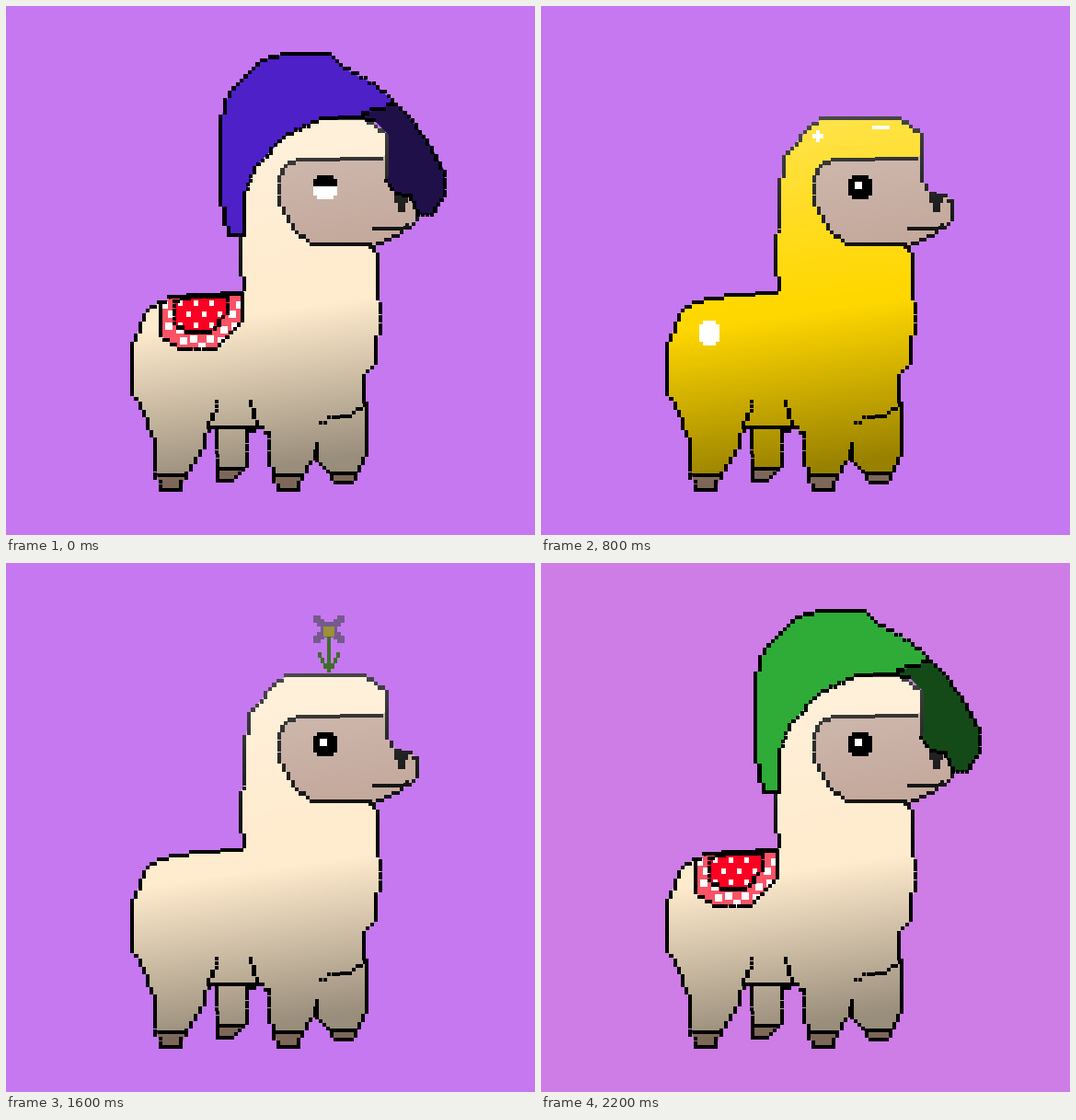
Animation, 575 px wide and 575 px high, one loop 2400 ms. Source, as an HTML page with a canvas:

```html
<!DOCTYPE html>
<html lang="en">
<head>
<meta charset="utf-8">
<title>Alpaca outfits</title>
<style>
html, body { margin: 0; width: 100%; height: 100%; overflow: hidden; }
canvas { display: block; width: 575px; height: 575px; }
</style>
</head>
<body>
<canvas id="stage" width="575" height="575"></canvas>
<script>
const SIZE = 575, CELL = 4.3, STEP = 200;
const stage = document.getElementById('stage').getContext('2d');
const layer = document.createElement('canvas');
layer.width = layer.height = SIZE;
const coat = layer.getContext('2d');

const points = s => s.split(' ').map(p => p.split(',').map(Number));

// Key points, clockwise: head and chest, legs from front to back, rump and neck
const BODY = points(
  '308,122 390,122 414,140 414,190 424,204 440,206 447,212 447,232 430,246 396,262 404,270 404,318 407,324 407,356 402,364 402,388 389,402 389,430 ' +
  '392,432 392,488 376,518 358,518 350,506 338,494 338,476 336,492 322,510 318,526 296,526 286,490 286,464 275,458 262,460 262,500 246,516 230,516 229,458 221,458 211,488 196,508 190,526 168,526 162,500 162,476 146,432 ' +
  '137,422 137,372 150,336 166,322 210,314 256,312 259,304 255,280 255,250 259,240 259,206 264,164 296,128');
const MUZZLE = BODY.slice(3, 10);
const FACE = points('396,259 332,259 312,242 297,212 297,186 304,174 322,167 408,166 414,160');
const CREASES = ['229,430 229,440 220,458 270,458', '266,430 273,456 266,462',
  '342,453 356,447 374,446 390,434', '400,242 430,242 436,238'].map(points);
const HOOVES = points('164,510 229,503 290,510 350,508');

// Starts with the unlined edge over the face; the first 15 points bound the brim
const HAT = points('384,121 400,124 416,140 416,184 413,190 424,204 440,206 448,227 463,227 470,216 477,206 477,180 458,146 434,116 424,107 ' +
  '400,84 386,78 368,68 352,52 304,52 278,59 243,94 233,124 233,208 242,249 259,249 259,208 270,176 302,143 342,122');
const BRIM = [...HAT.slice(0, 15), [402, 112]];
const RUG = points('168,322 186,316 210,314 257,313 257,342 228,373 188,373 168,358');

const scaled = (pts, k, cx = 211, cy = 320) => pts.map(([x, y]) => [cx + (x - cx) * k, cy + (y - cy) * k]);

function trace(g, pts) {
  g.beginPath();
  pts.forEach(p => g.lineTo(...p));
  g.closePath();
}

function fill(g, pts, color) {
  trace(g, pts);
  g.fillStyle = color;
  g.fill();
}

function clipped(g, pts, paint) {
  g.save();
  trace(g, pts);
  g.clip();
  paint();
  g.restore();
}

function rect(g, color, x, y, w, h) {
  const l = Math.round(x), t = Math.round(y);
  g.fillStyle = color;
  g.fillRect(l, t, Math.round(x + w) - l, Math.round(y + h) - t);
}

// Rectangle without its corner pixels
function block(g, color, x, y, w, h) {
  rect(g, color, x + 4, y, w - 8, h);
  rect(g, color, x, y + 4, w, h - 8);
}

// Line of square pixels that moves in whole steps on both axes
function line(g, pts, closed) {
  const path = closed ? [...pts, pts[0]] : pts;
  for (let k = 1; k < path.length; k++) {
    const a = path[k - 1], b = path[k];
    const steps = [0, 1].map(d => Math.round(Math.abs(b[d] - a[d]) / CELL) || 1);
    const n = Math.max(...steps);
    for (let s = 0; s <= n; s++) {
      const [x, y] = [0, 1].map(d => a[d] + (b[d] - a[d]) * Math.round(s / n * steps[d]) / steps[d]);
      rect(g, '#000', x - CELL / 2, y - CELL / 2, CELL, CELL);
    }
  }
}

function randomFrom(seed) {
  return () => (seed = seed * 16807 % 2147483647) / 2147483647;
}

// Ragged blobs leaning to the upper right, on a jittered staggered lattice
function spots(g, color, { x, y, dx, dy, w, h, seed }) {
  const rnd = randomFrom(seed);
  for (let r = 0; r < 10; r++) {
    for (let c = 0; c < 8; c++) {
      const cx = x + (c + r % 2 / 2 + (rnd() - 0.5) * 0.3) * dx;
      const cy = y + (r + (rnd() - 0.5) * 0.3) * dy;
      const width = w * (0.7 + 0.6 * rnd()), rows = Math.round(h / CELL * (0.8 + 0.5 * rnd()));
      for (let k = 0; k < rows; k++) {
        const v = (k + 0.5) / rows * 2 - 1, span = width * (1 - 0.6 * v * v);
        rect(g, color, cx - span / 2 - v * w * 0.15, cy + (k - rows / 2) * CELL, span, CELL);
      }
    }
  }
}

const COAT_SPOTS = { x: 160, y: 145, dx: 72, dy: 47, w: 25, h: 15, seed: 21 };
const HAT_SPOTS = { x: 240, y: 62, dx: 33, dy: 18, w: 10, h: 9, seed: 8 };

function drawBody({ base, dots, shine, light }) {
  coat.globalCompositeOperation = 'source-over';
  coat.clearRect(0, 0, SIZE, SIZE);
  fill(coat, BODY, base);
  clipped(coat, BODY, () => {
    if (dots) spots(coat, dots, COAT_SPOTS);
    HOOVES.forEach(([x, y]) => {
      rect(coat, light ? '#e6bfa5' : '#cfab93', x, y, 32, 30);
      rect(coat, '#000', x, y - 2, 32, 4);
    });
  });
  fill(coat, [...FACE, ...MUZZLE], light ? '#c9a994' : '#bfa294');
  line(coat, BODY, true);
  line(coat, FACE);
  CREASES.forEach(c => line(coat, c));
  rect(coat, '#000', 422, 204, 15, 10);
  rect(coat, '#000', 426, 212, 8, 12);

  // Light from above, shade below
  const shade = coat.createLinearGradient(250, 120, 305, 500);
  shade.addColorStop(0, 'rgba(255,255,255,.3)');
  shade.addColorStop(0.53, 'rgba(255,255,255,0)');
  shade.addColorStop(0.56, 'rgba(0,0,0,0)');
  shade.addColorStop(1, 'rgba(0,0,0,.4)');
  coat.globalCompositeOperation = 'source-atop';
  coat.fillStyle = shade;
  coat.fillRect(0, 0, SIZE, SIZE);
  stage.drawImage(layer, 0, 0);

  if (shine) {
    rect(stage, '#fff', 360, 130, 19, 4);
    block(stage, '#fff', 295, 135, 12, 13);
    block(stage, '#fff', 172, 342, 22, 27);
  }
}

function drawEye(kind) {
  block(stage, '#000', 334, 184, 26, 26);
  if (kind === 'open') rect(stage, '#fff', 341, 191, 8, 8);
  if (kind === 'sleepy') {
    rect(stage, '#fff', 334, 196, 26, 10);
    rect(stage, '#fff', 338, 206, 18, 4);
  }
  if (kind === 'glint') {
    for (let k = 0; k < 3; k++) rect(stage, '#fff', 346 - 4 * k, 188 + 4 * k, 4, 4);
  }
}

function drawHat({ color, shade, dots }) {
  fill(stage, HAT, color);
  if (dots) clipped(stage, HAT, () => spots(stage, dots, HAT_SPOTS));
  fill(stage, BRIM, shade);
  line(stage, [...HAT.slice(4), HAT[0], HAT[1]]);
  line(stage, [HAT[0], ...BRIM.slice(-1), HAT[14]]);
}

function drawRug(kind) {
  const pad = scaled(RUG, 0.65);
  if (kind === 'red') {
    fill(stage, RUG, '#fa5366');
    for (let k = 0; k < 13; k++) {
      const a = Math.PI * (k / 12), r = k % 2 ? 34 : 41;
      rect(stage, '#fff', 209 - Math.cos(a) * r, 321 + Math.sin(a) * (r + 4), 8, 8);
    }
    fill(stage, pad, '#fa0022');
    for (let k = 0; k < 9; k++) {
      rect(stage, '#fff', 187 + k % 3 * 17 + (k / 3 & 1) * 9, 320 + Math.floor(k / 3) * 12, 5, 6);
    }
  } else {
    const bands = ['#1a00ff', '#3d60b8', '#3ea5b8', '#3fae95', '#45b84a'];
    bands.forEach((c, k) => fill(stage, scaled(RUG, 1 - k * 0.185), c));
  }
  line(stage, RUG, true);
  line(stage, pad, true);
}

function drawFlower() {
  const petal = '#755a8d', leaf = '#3d6e2a', x = 351;
  rect(stage, petal, x - 9, 64, 18, 17);
  for (const side of [-1, 1]) {
    for (const end of [-1, 1]) {
      rect(stage, petal, x + side * 13 - 4, 72 + end * 11 - 4, 8, 8);
      rect(stage, petal, x + side * 9 - 4, 72 + end * 7 - 4, 8, 8);
    }
    for (let k = 0; k < 3; k++) rect(stage, leaf, x - 2 + side * (4 + 3 * k), 109 - 6 * k, 4, 6);
  }
  rect(stage, '#9c9038', x - 6, 69, 12, 11);
  rect(stage, leaf, x - 2, 80, 4, 39);
}

const PURPLE = '#c678f0', PINK = '#ce7ce6', BLUE = '#a4bcdc', DIM = 'rgba(0,0,0,.57)';
const cream = { base: '#ffebcd' }, gold = { base: '#ffd700', shine: true }, orange = { base: '#da911e' };
const moss = { base: '#52694c', light: true }, violet = { base: '#5c20b2', dots: '#8435ff', light: true };
const indigo = { color: '#4e20c8', shade: 'rgba(8,8,6,.65)' }, green = { color: '#2eac37', shade: DIM };
const grey = { color: '#727272', shade: DIM, dots: '#1ab0cc' };

const LOOKS = [
  { bg: PURPLE, body: cream, hat: indigo, eye: 'sleepy', rug: 'red' },
  { bg: BLUE, body: cream, hat: indigo, eye: 'sleepy' },
  { bg: BLUE, body: moss, hat: indigo, eye: 'sleepy', rug: 'blue' },
  { bg: PURPLE, body: cream, eye: 'open' },
  { bg: PURPLE, body: gold, eye: 'open' },
  { bg: BLUE, body: violet, hat: grey, eye: 'sleepy' },
  { bg: BLUE, body: cream, hat: green, eye: 'open' },
  { bg: BLUE, body: orange, eye: 'open', flower: true },
  { bg: PURPLE, body: cream, eye: 'open', flower: true },
  { bg: BLUE, body: cream, eye: 'glint', flower: true },
  { bg: PINK, body: moss, hat: indigo, eye: 'open', rug: 'blue' },
  { bg: PINK, body: cream, hat: green, eye: 'open', rug: 'red' }
];

function draw(look) {
  rect(stage, look.bg, 0, 0, SIZE, SIZE);
  drawBody(look.body);
  drawEye(look.eye);
  if (look.rug) drawRug(look.rug);
  if (look.hat) drawHat(look.hat);
  if (look.flower) drawFlower();
}

const start = performance.now();
let shown = -1;
function tick() {
  const now = Math.floor((performance.now() - start) / STEP) % LOOKS.length;
  if (now !== shown) draw(LOOKS[shown = now]);
  requestAnimationFrame(tick);
}
tick();
</script>
</body>
</html>
```
